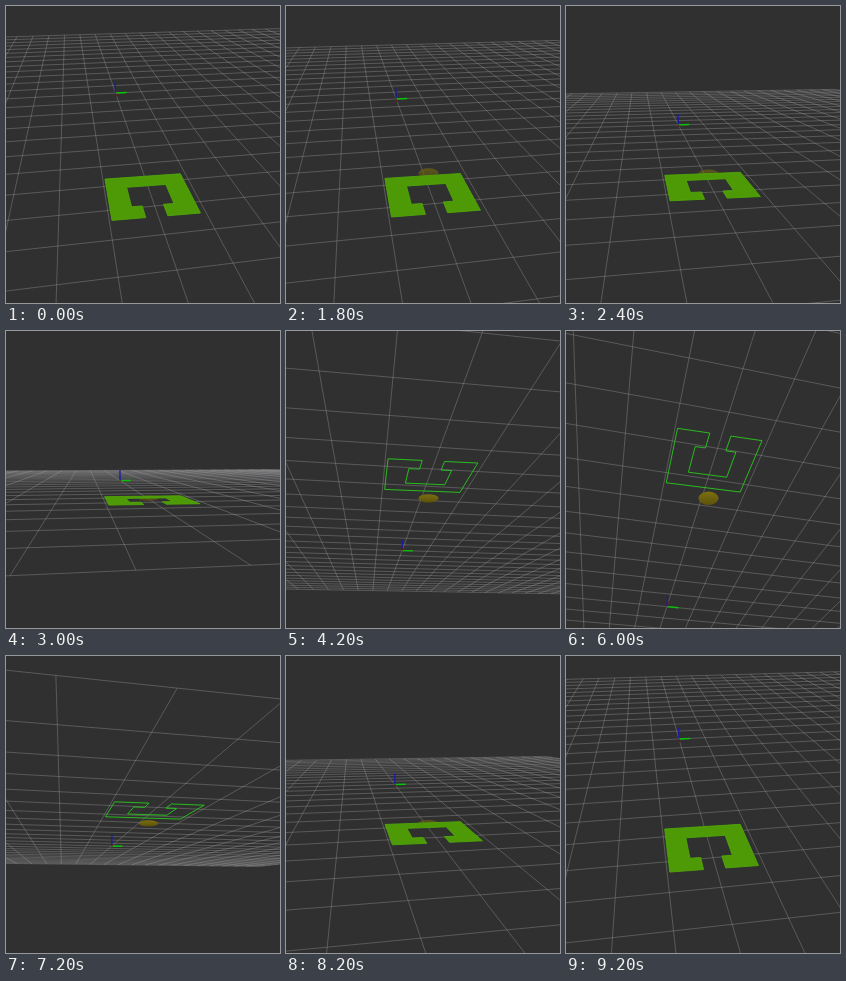
Write an HTML page with a canvas that moves like this. It is 274 px wide and 297 px high and loops after 10000 ms.

```html
<!DOCTYPE html>
<html lang="en">
<head>
<meta charset="utf-8">
<title>Orbiting a ground grid</title>
<style>
  html, body { margin: 0; width: 100%; height: 100%; overflow: hidden; background: #303030; }
  canvas { display: block; width: 274px; height: 297px; }
</style>
</head>
<body>
<canvas id="stage" width="274" height="297"></canvas>
<script>
const ctx = document.getElementById('stage').getContext('2d');
const LOOP = 10000, STEP = 200;
const DRAG_START = 800, DRAG_END = 9200;

// Orbit camera: the focal point lies slightly below the ground plane.
const FOCAL_LENGTH = 403, DISTANCE = 10;
const CENTER = { x: 142, y: 167 };
const FOCUS = { x: 6.4, y: 0.137, z: -0.073 };
const GRID_HALF = 13, AXIS_LENGTH = 0.43;

const radians = degrees => degrees * Math.PI / 180;
const mix = (a, b, k) => a + (b - a) * k;
const progress = (time, start, end) => Math.min(1, Math.max(0, (time - start) / (end - start)));

// The first drag accelerates down below the ground, the second slows on the way back.
function pitchAt(time) {
  if (time < 6000) return mix(28.6, -38.6, progress(time, 1600, 5000) ** 1.215);
  return mix(30, -40.5, (1 - progress(time, 6000, DRAG_END)) ** 1.25);
}

function yawAt(time) {
  if (time <= 4200) return mix(10, 8, progress(time, 1600, 4200));
  if (time < 6000) return mix(8, 12.4, progress(time, 4200, 5000));
  return mix(12.4, 8.75, progress(time, 6000, DRAG_END) ** 2);
}

// U-shaped dock, open towards +x: one half mirrored, in units of the wall thickness
function makeDock() {
  const wall = 0.457, back = 6.68, skew = 0.03;
  const half = [[0, 2], [3.75, 2], [3.75, 0.5], [2.8, 0.5], [2.8, 1], [1, 1]];
  const mirrored = half.map(([x, y]) => [x, -y]).reverse();
  return [...half, ...mirrored].map(([x, y]) =>
    [back + wall * (x + skew * y), wall * y - 0.032, 0]);
}
const DOCK = makeDock();

function makeProjector(pitch, yaw) {
  const sp = Math.sin(pitch), cp = Math.cos(pitch);
  const sy = Math.sin(yaw), cy = Math.cos(yaw);
  return ([x, y, z]) => {
    const forward = FOCUS.x - x, side = y - FOCUS.y, up = z - FOCUS.z;
    const right = side * cy - forward * sy;
    const ahead = forward * cy + side * sy;
    const scale = FOCAL_LENGTH / (DISTANCE + ahead * cp - up * sp);
    return [CENTER.x + right * scale, CENTER.y - (ahead * sp + up * cp) * scale];
  };
}

function trace(points) {
  ctx.beginPath();
  points.forEach(([x, y]) => ctx.lineTo(x, y));
}

function stroke(color, width) {
  ctx.strokeStyle = color;
  ctx.lineWidth = width;
  ctx.stroke();
}

function drawLine(project, from, to, color, width) {
  trace([project(from), project(to)]);
  stroke(color, width);
}

function drawGrid(project) {
  const color = 'rgba(160,160,164,0.37)';
  for (let i = -GRID_HALF; i <= GRID_HALF; i++) {
    drawLine(project, [i, -GRID_HALF, 0], [i, GRID_HALF, 0], color, 1);
    drawLine(project, [-GRID_HALF, i, 0], [GRID_HALF, i, 0], color, 1);
  }
}

function drawAxes(project) {
  const origin = [0, 0, 0];
  drawLine(project, origin, [0, 0, AXIS_LENGTH], '#1a1aa8', 1.3);
  drawLine(project, origin, [0, AXIS_LENGTH, 0], '#08c408', 1.4);
  drawLine(project, origin, [AXIS_LENGTH, 0, 0], '#701818', 1.2);
}

function drawDock(project, fromAbove) {
  trace(DOCK.map(project));
  ctx.closePath();
  if (fromAbove) {
    ctx.fillStyle = '#4e9a06';
    ctx.fill();
  }
  stroke(fromAbove ? '#4fa60a' : '#2aca1e', 0.9);
}

// Flattened sphere marking the focal point
function drawFocus(pitch, fromAbove) {
  const radius = 10;
  const height = radius * Math.hypot(Math.sin(pitch), Math.cos(pitch) / 4);
  const shade = ctx.createLinearGradient(0, CENTER.y - height, 0, CENTER.y + height);
  shade.addColorStop(0, '#7c7012');
  shade.addColorStop(1, '#5e520a');
  ctx.globalAlpha = fromAbove ? 0.6 : 1;
  ctx.fillStyle = shade;
  ctx.beginPath();
  ctx.ellipse(CENTER.x + 0.5, CENTER.y + 0.3, radius, height, 0, 0, 2 * Math.PI);
  ctx.fill();
  ctx.globalAlpha = 1;
}

function render(time) {
  const steppedTime = Math.floor(time / STEP) * STEP;
  const pitch = radians(pitchAt(steppedTime));
  const project = makeProjector(pitch, radians(yawAt(steppedTime)));
  const fromAbove = pitch > 0;
  const dragging = time >= DRAG_START && time < DRAG_END;

  ctx.fillStyle = '#303030';
  ctx.fillRect(0, 0, 274, 297);
  drawGrid(project);
  drawAxes(project);
  if (dragging && fromAbove) drawFocus(pitch, true);
  drawDock(project, fromAbove);
  if (dragging && !fromAbove) drawFocus(pitch, false);
}

const start = performance.now();
function tick() {
  render((performance.now() - start) % LOOP);
  requestAnimationFrame(tick);
}
tick();
</script>
</body>
</html>
```
